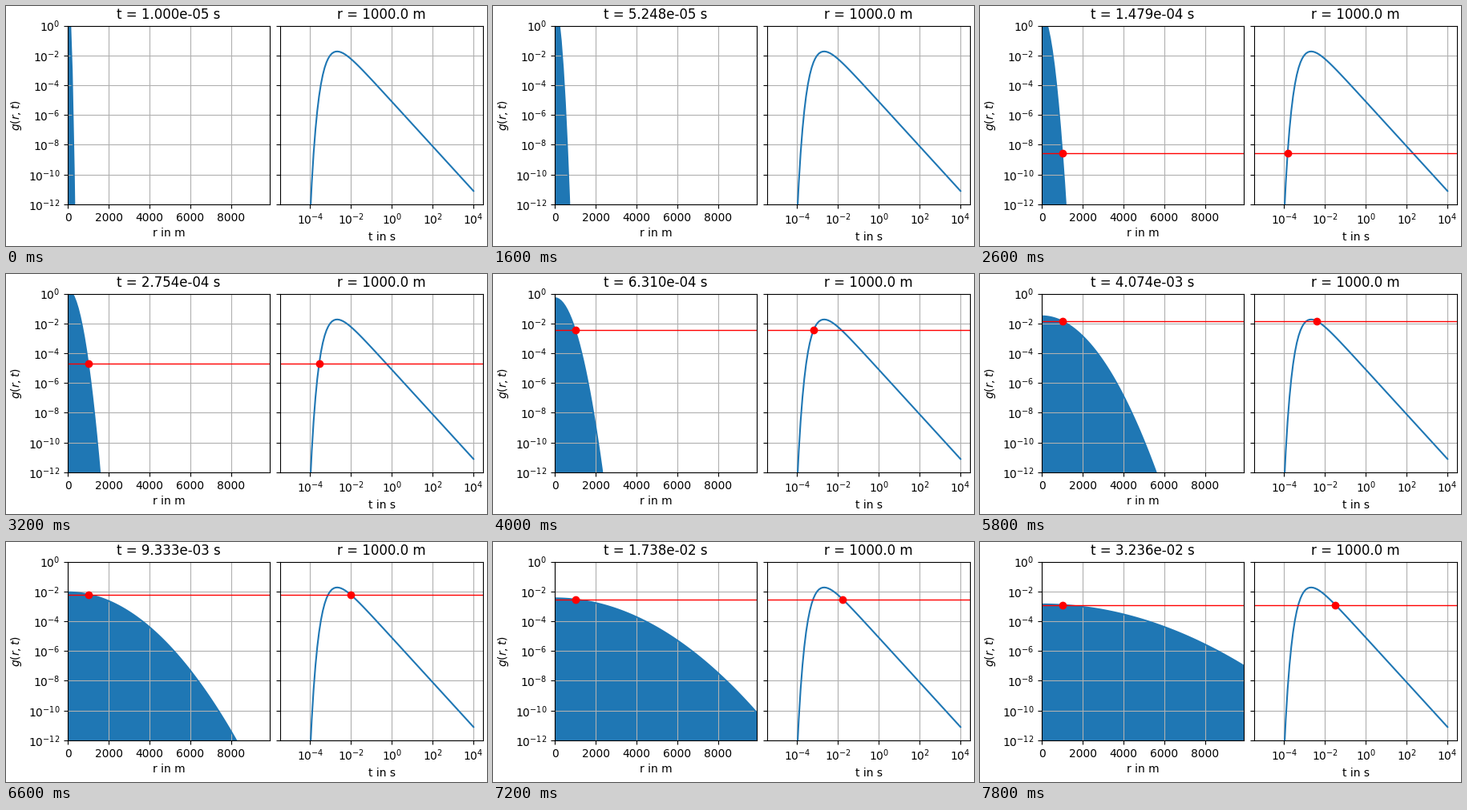
These frames come from a looping animation (600x300 px, 8 s). A matplotlib script:

```python
import numpy as np
import matplotlib.pyplot as plt
from matplotlib.animation import FuncAnimation

MU = 4e-7 * np.pi      # vacuum permeability
SIGMA = 0.01           # conductivity in S/m
R_PROBE = 1000.0
FLOOR = 1e-30
STEPS = 40


def green(r, t):
    """Diffusive Green's function at distance r and time t."""
    a = MU * SIGMA
    return np.sqrt(a / np.pi) / (8 * t**1.5) * np.exp(-a * r**2 / (4 * t))


r = np.arange(0, 10000, 100.0)
times = np.logspace(-5, 4, 101)

fig, (ax_r, ax_t) = plt.subplots(
    1, 2, figsize=(6, 3), dpi=100, sharey=True, layout="constrained")
# let the titles sit two pixels closer to the top edge
fig.get_layout_engine().set(rect=(0, 0, 1, 302 / 300))

start = np.maximum(green(r, times[0]), FLOOR)
fill = ax_r.fill_between(r, FLOOR, start, color="C0", lw=0)
curve, = ax_r.plot(r, start, "C0")
ax_r.set_xlabel("r in m")
ax_r.set_ylabel("$g(r,t)$")
title = ax_r.set_title("")

ax_t.loglog(times, green(R_PROBE, times))
ax_t.set_xlabel("t in s")
ax_t.set_title(f"r = {R_PROBE:.1f} m")

levels = [ax.axhline(FLOOR, color="r", lw=1) for ax in (ax_r, ax_t)]
dot_r, = ax_r.plot([R_PROBE], [FLOOR], "ro")
dot_t, = ax_t.plot([times[0]], [FLOOR], "ro")

ax_r.set_xlim(r[0], r[-1])
ax_t.set_xlim(10**-5.45, 10**4.45)
ax_r.set_ylim(1e-12, 1)
for ax in (ax_r, ax_t):
    ax.grid(True)


def update(i):
    t = times[i]
    g = np.maximum(green(r, t), FLOOR)
    outline = np.column_stack([np.r_[r[0], r, r[-1]], np.r_[FLOOR, g, FLOOR]])
    fill.set_verts([outline])
    curve.set_ydata(g)

    level = max(green(R_PROBE, t), FLOOR)
    for line in levels:
        line.set_ydata([level, level])
    dot_r.set_ydata([level])
    dot_t.set_data([t], [level])
    title.set_text(f"t = {t:.3e} s")
    return [fill, curve, *levels, dot_r, dot_t, title]


anim = FuncAnimation(fig, update, frames=STEPS, interval=200, repeat=True)
plt.show()
```
